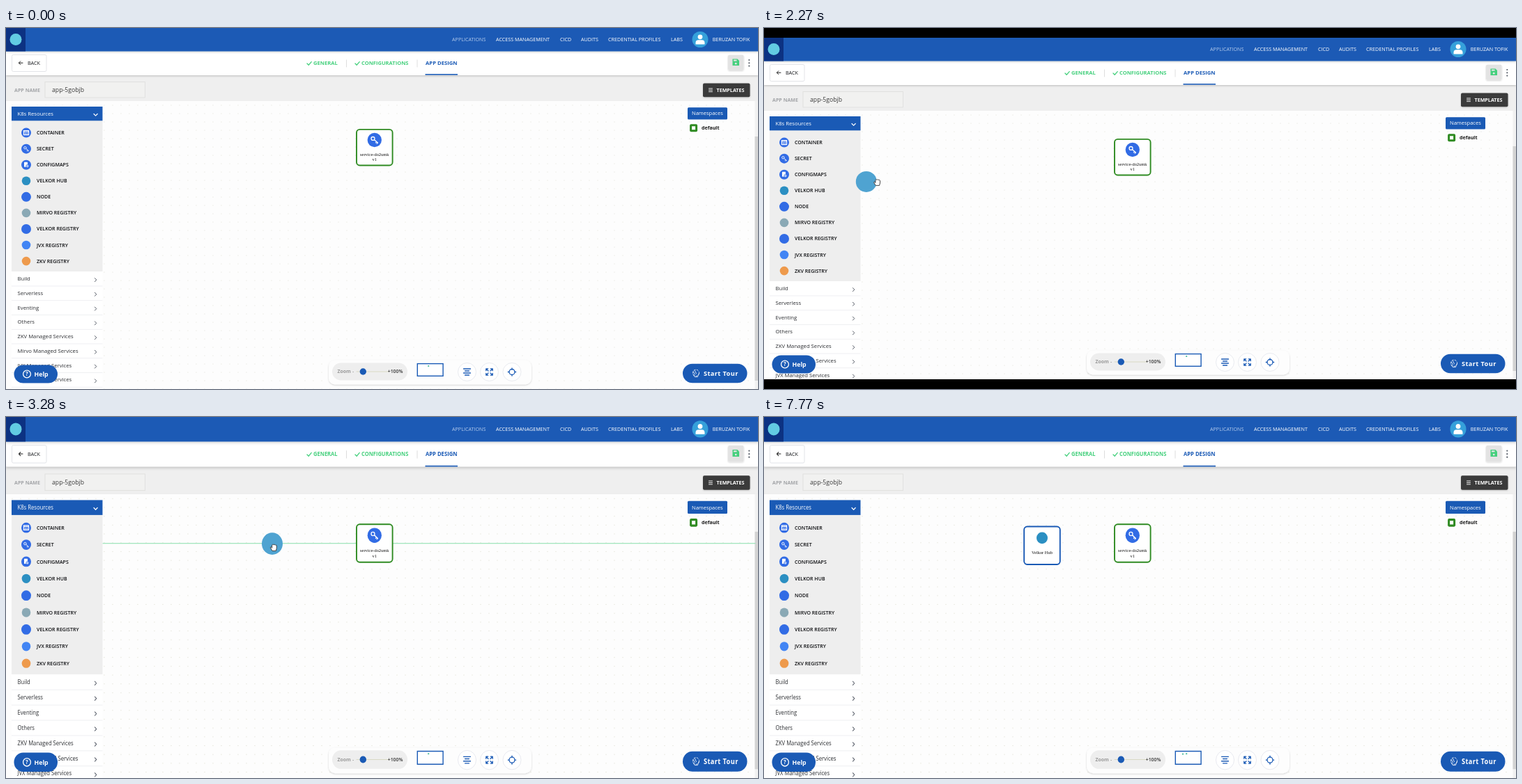
Animation of 1079 by 519 pixels, one loop 9750 ms. Source, as an HTML page:

```html
<!DOCTYPE html>
<html lang="en">
<head>
<meta charset="utf-8">
<title>App design</title>
<style>
  html, body { margin: 0; height: 100%; overflow: hidden; background: #000; }
  svg { display: block; width: 100vw; height: 100vh; }
  text { font-family: "Open Sans", "Noto Sans", sans-serif; font-weight: 500; white-space: pre; }
  .serif { font-family: "Liberation Serif", serif; font-weight: 400; }
  .semi { font-weight: 600; }
  .bold { font-weight: 700; }
  .line { fill: none; stroke-linecap: round; stroke-linejoin: round; }
</style>
</head>
<body>
<svg id="stage" viewBox="0 0 1079 519" preserveAspectRatio="none"></svg>
<script>
const BLUE = '#1a5ab5', GREEN = '#45d07d', NODE_GREEN = '#2f8b22', K8S = '#326ce5';
const LOOP = 9750, FULL = 519, SHORT = 491;

// Text is placed by the vertical middle of its capitals.
const text = (x, y, str, size = 7.2, fill = '#16181c', attrs = '') =>
  `<text x="${x}" y="${y + size * 0.36}" font-size="${size}" fill="${fill}" ${attrs}>${str}</text>`;
const box = (x, y, w, h, fill, attrs = '') =>
  `<rect x="${x}" y="${y}" width="${w}" height="${h}" fill="${fill}" ${attrs}/>`;
const disc = (x, y, r, fill, attrs = '') =>
  `<circle cx="${x}" cy="${y}" r="${r}" fill="${fill}" ${attrs}/>`;
const line = (d, color, width = 1, attrs = '') =>
  `<path class="line" d="${d}" stroke="${color}" stroke-width="${width}" ${attrs}/>`;
const group = (x, y, body, scale = 1) =>
  `<g transform="translate(${x} ${y}) scale(${scale})">${body}</g>`;
const BOLD = 'class="bold"', SEMI = 'class="semi"';

const glyphs = {
  container: box(-3.5, -3, 7, 6, 'none', 'stroke="#fff" stroke-width="1.2"') +
    line('M-3.5-1.6H3.5M-1.2 0V2M1.2 0V2', '#fff', 0.9),
  key: disc(-1.6, -1.4, 1.7, 'none', 'stroke="#fff" stroke-width=".9"') +
    line('M-.2-.2L3.2 2.8M2 1.8L1.2 2.7M3 2.7L2.3 3.5', '#fff', 0.9),
  config: box(-3, -4, 5, 7, '#fff', 'rx=".6"') +
    disc(1.8, 1.8, 2, '#fff', `stroke="${K8S}" stroke-width=".9"`) + disc(1.8, 1.8, 0.7, K8S),
};
const badge = (x, y, glyph, scale = 1) => group(x, y, disc(0, 0, 7, K8S) + (glyphs[glyph] || ''), scale);

function header() {
  const nav = [[640, 'APPLICATIONS', '#b4cbec'], [703, 'ACCESS MANAGEMENT'], [795, 'CICD'],
    [825, 'AUDITS'], [864, 'CREDENTIAL PROFILES'], [954, 'LABS']];
  const check = x => line(`M${x} 51l2.2 2.2 4-4.6`, GREEN, 1.3);
  return box(0, 68, 1079, 37, '#efefef') +
    box(0, 33, 1079, 35, '#fff', 'filter="url(#soft)"') +
    box(0, 0, 1079, 33.5, BLUE, 'filter="url(#soft)"') +
    box(0, 0, 28, 33.5, '#0c3282') + disc(14, 16.5, 8.5, '#62cbe2') +
    nav.map(([x, label, color = '#fff']) => text(x, 16.7, label, 7.2, color)).join('') +
    disc(996, 16.5, 11.5, '#35a0da') + disc(996, 12.8, 3.4, '#fff') +
    '<path d="M989.5 23.5v-2.2q0-4 4-4h5q4 0 4 4v2.2z" fill="#fff"/>' +
    text(1067.5, 16.7, 'BERUZAN TOFIK', 7.2, '#fff', 'text-anchor="end"') +

    box(8.5, 38.5, 49.5, 24, '#fff', 'rx="2" stroke="#dcdee3" stroke-width=".8"') +
    line('M24 50.2H18.5M20.8 47.8L18.4 50.2l2.4 2.4', '#222', 1) + text(31, 50.4, 'BACK') +
    check(432) + text(441, 50.7, 'GENERAL', 7.6, GREEN, BOLD) +
    check(501) + text(510, 50.7, 'CONFIGURATIONS', 7.55, GREEN, BOLD) +
    text(602, 50.3, 'APP DESIGN', 7.7, BLUE, BOLD) + box(601.5, 66, 46.5, 1.6, BLUE) +
    line('M488.5 46V56M590 46V56', '#d6d6d6', 0.8) +

    box(1036, 38.8, 22.5, 22, '#e3e3e3', 'rx="2" filter="url(#shadow)"') +
    `<path d="M1042.5 44.5h7l2.5 2.5v7h-9.5z" fill="${GREEN}"/>` +
    box(1044, 45.6, 4.5, 2, '#e4e4e4') + disc(1047.2, 51.2, 1.4, '#e4e4e4') +
    [46, 50.3, 54.6].map(y => disc(1066.3, y, 1.1, '#5a616b')).join('') +

    text(12, 89, 'APP NAME', 7.1, '#a3a5a8', BOLD) +
    box(56, 77.5, 143.5, 22.5, '#f1f1f0', 'stroke="#dddddb" stroke-width=".8"') +
    text(66, 88.7, 'app-5gobjb', 8.7, '#3a3a3a') +
    box(1000, 79.6, 67.5, 19.6, '#3b3b3b', 'rx="2" filter="url(#shadow)"') +
    line('M1008.5 87h5M1008.5 89.3h5M1008.5 91.6h5', '#fff', 0.9) +
    text(1019.5, 89.3, 'TEMPLATES', 7.15, '#fff', BOLD);
}

function sidebar() {
  const logo = (color, r = 6.3) => y => disc(29, y, r, color);
  const items = [
    ['CONTAINER', y => badge(29, y, 'container')], ['SECRET', y => badge(29, y, 'key')],
    ['CONFIGMAPS', y => badge(29, y, 'config')], ['VELKOR HUB', logo('#2b8fc2')],
    ['NODE', logo(K8S, 7)], ['MIRVO REGISTRY', logo('#8aa9b5')],
    ['VELKOR REGISTRY', logo(K8S, 7)], ['JVX REGISTRY', logo('#4285f4')],
    ['ZKV REGISTRY', logo('#ee9a4c')],
  ];
  const sections = ['Build', 'Serverless', 'Eventing', 'Others', 'ZKV Managed Services',
    'Mirvo Managed Services', 'JVX Managed Services', 'Custom Data Services'];
  return box(8, 133, 130.5, 217, '#eeeeee') + box(8, 350, 130.5, 170, '#fff') +
    box(8, 113, 130.5, 20.3, BLUE) + text(16.5, 123, 'K8s Resources', 7.7, '#fff') +
    line('M126 123.5l2.6 2.6 2.6-2.6', '#fff', 1.2) +
    items.map(([label, icon], i) => {
      const y = 150.6 + 23.06 * i;
      return icon(y) + text(44, y, label, 7.05, '#0c0d10', SEMI);
    }).join('') +
    sections.map((label, i) => {
      const y = 360.4 + 20.75 * i;
      return text(16.5, y, label, 7.7, '#2d2f33') +
        line(`M127.4 ${y - 0.8}l2.4 2.5-2.4 2.5`, '#555b66', 1) +
        box(8, y + 10.2, 130.5, 0.8, '#ebecef');
    }).join('');
}

const canvasArea = () =>
  box(0, 105, 1079, 414, '#fdfdfd') + box(0, 105, 1079, 414, 'url(#dots)') +
  box(1074.5, 105, 4.5, 414, '#f1f1f1') +
  box(978, 114.2, 57, 17.3, BLUE, 'rx="1.5"') + text(984, 122.7, 'Namespaces', 7.5, '#fff') +
  box(982.6, 139.7, 8, 8, '#fff', `stroke="${NODE_GREEN}" stroke-width="3" rx=".5"`) +
  text(998, 143, 'default', 7.1, '#1c1c1c', BOLD);

const node = (x, y, color, body) =>
  group(x, y, box(-25.8, -25.8, 51.6, 51.6, '#fff', `rx="4.5" stroke="${color}" stroke-width="1.9"`) + body);
const caption = (y, str) => text(0, y, str, 6.44, '#111', 'class="serif" text-anchor="middle"');

function controls() {
  const round = (x, d) => disc(x, 494.5, 13, '#fff', 'stroke="#e6e8ee" stroke-width=".9"') +
    group(x, 494.5, line(d, BLUE, 1.3));
  return box(463, 477.5, 291, 35, '#fdfdfd', 'rx="9" filter="url(#shadow)"') +
    box(468, 481.5, 108, 25, '#eeeeee', 'rx="12.5"') +
    text(475.5, 493.7, 'Zoom', 6.9, '#999', BOLD) + text(497, 493.7, '-', 7, '#777') +
    line('M503 494H549', '#d9d9c4', 1) + disc(512.3, 494, 4.7, BLUE) +
    text(547.7, 493.7, '+100%', 6.95, '#333', SEMI) +
    box(590.3, 482.6, 36.8, 17.7, '#fff', `stroke="${BLUE}" stroke-width="1.4"`) +
    box(605.2, 485, 2, 2, '#5cc3a6') + box(600, 485.4, 2, 2, '#5cc3a6', 'id="mapDot"') +
    round(661.5, 'M-5-4.5H5M-3-1.5H3M-5 1.5H5M-3 4.5H3') +
    round(693.5, 'M-4.7-1.8v-2.9h2.9M4.7-1.8v-2.9H1.8M-4.7 1.8v2.9h2.9M4.7 1.8v2.9H1.8' +
      'M-4.5-4.5l3 3M4.5-4.5l-3 3M-4.5 4.5l3-3M4.5 4.5l-3-3') +
    round(726, 'M-4 0a4 4 0 1 0 8 0a4 4 0 1 0-8 0M0-5.7v2M0 5.7v-2M-5.7 0h2M5.7 0h-2') +

    box(11.5, 484.4, 62.5, 26.2, BLUE, 'rx="13.1"') +
    disc(30, 497.5, 5.4, 'none', 'stroke="#fff" stroke-width="1.3"') +
    text(30, 497.5, '?', 8, '#fff', 'class="bold" text-anchor="middle"') +
    text(40.5, 497.5, 'Help', 8.8, '#fff', BOLD) +
    box(971, 482.8, 92.5, 27.5, BLUE, 'rx="13.7"') +
    disc(990, 495.8, 4.6, 'none', 'stroke="#fff" stroke-width=".8" stroke-dasharray="3 1.4"') +
    line('M986 498l2.3 3.6h4l2-5M988.5 498.2l-2.2-4.2M990.5 497l-2-4.2', '#fff', 0.8) +
    text(1001, 496.5, 'Start Tour', 9.2, '#fff', 'class="bold" letter-spacing=".4"');
}

const MOVE = 'M-4.6 0H4.6M0-4.6V4.6M-3-1.7L-4.7 0l1.7 1.7M3-1.7L4.7 0 3 1.7M-1.7-3L0-4.7l1.7 1.7M-1.7 3L0 4.7 1.7 3';
const HAND = 'M-2.5 4.5L-5 .5q-.4-1.6 1-1l1.2 1v-4q.8-1.5 1.6 0q.9-1.5 1.8 0q.9-1.1 1.7.3q1-.7 1.5.7v3.5L2.8 4.5z';

document.getElementById('stage').innerHTML = `
  <defs>
    <pattern id="dots" x="3" y="105" width="12" height="12" patternUnits="userSpaceOnUse">
      <circle cx="6" cy="6" r=".6" fill="#deded0"/>
    </pattern>
    <filter id="shadow" x="-10%" y="-20%" width="120%" height="150%">
      <feDropShadow dx="0" dy="1" stdDeviation="1.2" flood-opacity=".18"/>
    </filter>
    <filter id="soft" x="-1%" y="-20%" width="102%" height="150%">
      <feDropShadow dx="0" dy="1" stdDeviation="1.8" flood-opacity=".22"/>
    </filter>
  </defs>
  <g id="page">
    ${canvasArea()}
    ${box(1074.5, 156, 4.5, 350, '#d3d3d3', 'id="thumb"')}
    ${sidebar()}${header()}
    ${line('M139 172H1075', '#86dfaa', 1, 'id="guide"')}
    ${node(528.8, 171.7, NODE_GREEN, badge(0, -10.7, 'key', 1.45) + caption(9.5, 'service-do2umk') + caption(17.4, 'v1'))}
    <g id="dropped">${node(399, 174.8, BLUE, disc(0, -10.3, 8, '#2b8fc2') + caption(9.6, 'Velkor Hub'))}</g>
    <g id="bottom">${controls()}</g>
    <g id="ghost">${disc(0, 0, 15, '#4fa3d1')}</g>
    <g id="move">${line(MOVE, '#fff', 3)}${line(MOVE, '#111', 1.3)}</g>
    <path id="hand" d="${HAND}" fill="#fff" stroke="#333" stroke-width=".9" stroke-linejoin="round"/>
  </g>
  <g id="bars">${box(0, 0, 1079, 13.7, '#000')}${box(0, 505, 1079, 14, '#000')}</g>`;

const el = id => document.getElementById(id);
const show = (id, on) => el(id).setAttribute('display', on ? 'inline' : 'none');
const place = (id, [x, y]) => el(id).setAttribute('transform', `translate(${x} ${y})`);

const easeIn = p => p ** 1.5, easeOut = p => 1 - (1 - p) ** 2, linear = p => p;

// Each key is [time, x, y, easing towards this key].
const cursorKeys = [[450, 330, 400], [1000, 70.5, 222.5, easeOut], [1920, 70.5, 222.5],
  [2270, 162, 208, easeIn], [2870, 384.5, 177.5, easeOut], [3820, 384.5, 177.5],
  [3890, 401.5, 174.5], [4860, 401.5, 174.5],
  [5150, 399, 120], [5290, 399, 120], [5790, 352, -10, easeIn]];
const ghostKeys = [[1920, 58, 219], [2270, 146, 207, easeIn], [2870, 382, 172.3, easeOut]];

function along(keys, t) {
  const i = keys.findIndex(key => key[0] > t);
  if (i <= 0) return keys.at(i).slice(1, 3);
  const [t0, x0, y0] = keys[i - 1], [t1, x1, y1, ease = linear] = keys[i];
  const p = ease((t - t0) / (t1 - t0));
  return [x0 + (x1 - x0) * p, y0 + (y1 - y0) * p];
}

function render(t) {
  const letterbox = t >= 130 && t < 3280;
  const height = t < 130 ? FULL : SHORT;
  const stretch = t >= 3280 ? FULL / SHORT : 1;
  el('page').setAttribute('transform', `translate(0 ${letterbox ? 14 : 0}) scale(1 ${stretch})`);
  place('bottom', [0, height - FULL]);
  el('thumb').setAttribute('height', height - 168);
  show('bars', letterbox);

  const dragging = t >= 1920 && t < 3820;
  const dropped = t >= 3820;
  const cursor = along(cursorKeys, t);
  place('move', cursor);
  place('hand', cursor);
  place('ghost', along(ghostKeys, t));
  show('hand', dragging);
  show('ghost', dragging);
  show('move', t >= 450 && t < 5790 && !dragging);
  show('guide', t >= 2600 && t < 3480);
  show('dropped', dropped);
  show('mapDot', dropped);
}

const start = performance.now();
function tick() {
  render((performance.now() - start) % LOOP);
  requestAnimationFrame(tick);
}
tick();
</script>
</body>
</html>
```
